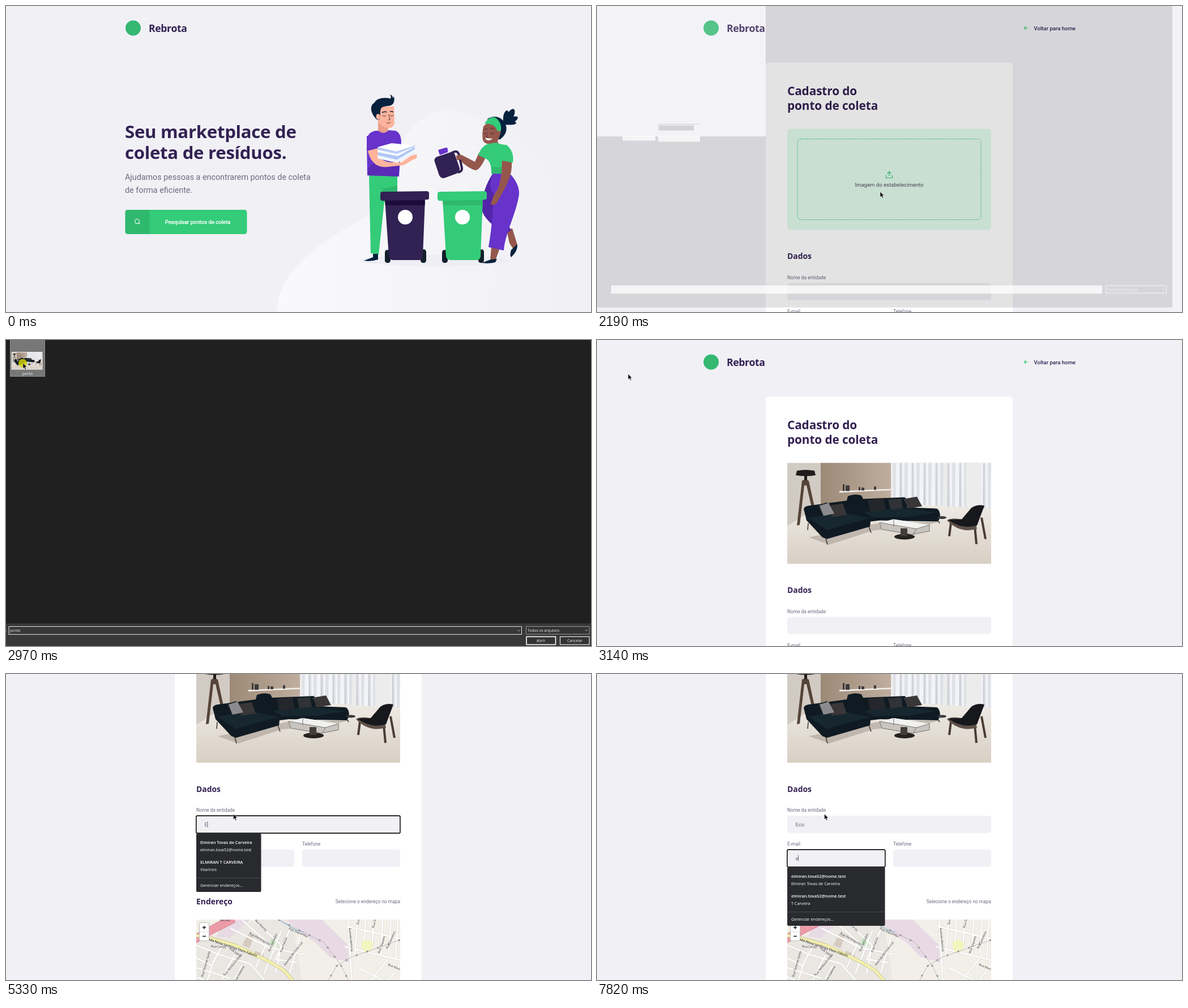
An HTML page that plays this animation: 1033x542 px, repeating every 8000 ms.

```html
<!DOCTYPE html>
<html lang="pt-BR">
<head>
<meta charset="utf-8">
<title>Cadastro de ponto de coleta</title>
<style>
  html, body { margin: 0; width: 100%; height: 100%; overflow: hidden; background: #f0f0f5; }
  svg { display: block; width: 100vw; height: 100vh; }
  text { font-family: Roboto, sans-serif; fill: #6c6c80; white-space: pre; }
  .title { font-family: "Noto Sans", "Open Sans", sans-serif; font-weight: 700; fill: #322153; }
  .h1 { font-size: 31.2px; letter-spacing: -.3px; }
  .h2 { font-size: 20.8px; letter-spacing: -.1px; }
  .h3 { font-size: 13.9px; }
  .brand { font-size: 17.6px; letter-spacing: -.35px; }
  .lead { font-size: 14.34px; }
  .label { font-size: 8.37px; }
  .body { font-size: 9.56px; }
  .field { fill: #f0f0f5; }
  .focus { fill: #f0f0f5; stroke: #101010; stroke-width: 1.6; }
  .skin { fill: #fdb39c; } .brown { fill: #95574c; }
  .navy { fill: #06213d; } .green { fill: #34cb79; } .deep { fill: #2fb86e; }
  .violet { fill: #6733cb; } .plum { fill: #322153; } .tyre { fill: #12202b; }
  .thin { fill: none; stroke: #3a2030; stroke-width: .9; stroke-linecap: round; }
  .ui text, .menu text { font-family: "Open Sans", "Noto Sans", sans-serif; font-size: 6.7px; fill: #f4f4f4; }
  .menu text { font-size: 7.2px; fill: #fff; }
  .menu .strong { font-weight: 600; font-size: 7.4px; }
  .menu path { stroke: #46484b; }
  .menu rect { fill: #292a2d; }
  .streets { fill: none; stroke-linejoin: round; }
  .map text { font-family: "Noto Sans", sans-serif; font-size: 5.4px; fill: #444; }
</style>
</head>
<body>
<svg viewBox="0 0 1033 542" preserveAspectRatio="none">
  <defs>
    <linearGradient id="blob" x1="0" x2="1"><stop stop-color="#f9f9fb"/><stop offset=".5" stop-color="#f5f5f8"/><stop offset="1" stop-color="#f0f0f5"/></linearGradient>
    <linearGradient id="wall"><stop stop-color="#9c8976"/><stop offset="1" stop-color="#bfae9f"/></linearGradient>
    <linearGradient id="floor" x2="0" y2="1"><stop stop-color="#eeeae4"/><stop offset="1" stop-color="#d8cfc4"/></linearGradient>
    <pattern id="curtain" width="21" height="90" patternUnits="userSpaceOnUse">
      <path fill="#dfe1e7" d="M0 0H21V90H0Z"/><path fill="#f3f4f8" d="M3 0H9V90H2ZM14 0H18V90H15Z"/><path fill="#c6c9d1" d="M11 0H12V90H10Z"/>
    </pattern>
    <clipPath id="photoBox"><path d="M0 0H360V179H0Z"/></clipPath>
    <clipPath id="mapBox"><rect width="360" height="209" rx="3"/></clipPath>
    <path id="roads" d="M0 45L40 62 95 78 120 107 135 209M12 130L30 75 45 48M35 130L58 80 70 60M55 130L80 82M80 0L125 40 105 85M100 0L150 45 140 95M60 15L130 50 190 62M150 20L120 95M168 12L140 70 178 76M0 85L60 104M0 68L28 82M0 102L90 135M183 30L165 95M285 0L280 60M299 0L295 55M314 0L310 50M329 0L326 62M344 0L340 58M356 0L352 70M265 12L360 34M262 48L360 72M290 130L345 62M322 130L360 80M268 0L276 130M285 85L360 122"/>

    <g id="photo" clip-path="url(#photoBox)">
      <path fill="#d2cbc4" d="M0 0H360V179H0Z"/>
      <path fill="url(#wall)" d="M59 0H183V75H59Z"/>
      <path fill="url(#curtain)" d="M187 0H360V90H187Z"/>
      <path fill="#edeced" d="M183 0H187V80H183ZM276 0H282V85H276ZM316 0H343V85H316Z"/>
      <path fill="url(#floor)" d="M0 112L60 74H232L360 82V179H0Z"/>
      <path fill="#f1eeea" d="M92 50L187 46V48.500L92 53Z"/>
      <path fill="#3e3b3b" d="M98 38h3v12h-3zM103 40h7v10h-7zM126 43h3v6h-3zM131 44h5v5h-5zM153 42h4v6h-4z"/>
      <path fill="#554438" d="M26 32Q32 27 38 32L48 78 43 79 34 40H30L22 110 17 111Z"/>
      <path fill="#201c1b" d="M17 14Q32 11 48 14L50 22Q33 25 15 22ZM30 22h5v9h-5z"/>
      <path fill="#a99f95" opacity=".6" d="M38 132L146 110 164 106 270 104 240 112 152 120 74 145Z"/>
      <path fill="#0f1a22" d="M29 82Q30 77 38 76L105 67 107 59Q120 54 131 58L134 64 207 61Q211 62 212 79L264 81Q270 84 270 97L266 104 164 102 147 104 146 113 70 135 62 132 34 102Z"/>
      <path fill="#17272f" d="M37 98L92 87 146 98 70 119ZM135 87L205 80 262 88 214 96 152 97Z"/>
      <path fill="#23272b" d="M54 75L70 70 82 90 63 94ZM142 66L170 63 174 84 146 86Z"/>
      <path fill="#393638" d="M77 75L98 72 105 92 79 96ZM205 64L229 60 238 77 214 81Z"/>
      <path fill="#8b8b8d" d="M57 76L73 71 83 90 64 94Z"/>
      <path fill="#303237" d="M178 65L201 63 204 80 182 83Z"/>
      <path fill="none" stroke="#403c3b" stroke-width="1.600" d="M37 107L36 119M68 134L71 145M144 113L148 124M266 102L269 107"/>
      <ellipse cx="273" cy="97" rx="8" ry="2.500" fill="#393a3d"/>
      <path fill="#c8c5c0" d="M163 106L187 100 251 109V121L220 127 167 118Z"/>
      <path fill="#f1f2f0" d="M164 106L188 100 251 110 228 117Z"/>
      <path fill="none" stroke="#777370" d="M163 106L167 118 220 127 251 121V110L228 117 163 106M228 117L222 127M188 100V113"/>
      <ellipse cx="207" cy="131" rx="18" ry="5" fill="#25211f"/>
      <path fill="#433d3a" d="M200 116h12v14h-12z"/>
      <path fill="none" stroke="#493c35" stroke-width="4" d="M289 106L286 130M331 112L334 144M343 97L350 135"/>
      <path fill="#5d5048" d="M282 102Q297 93 333 109L335 117Q305 126 282 102Z"/>
      <path fill="#17181c" d="M284 101L308 100 325 80Q335 73 348 76L335 111Q309 119 284 101Z"/>
    </g>

    <g id="brand"><circle cx="14.5" cy="39" r="13.5" fill="#34b872"/><text class="title brand" x="42" y="46">Rebrota</text></g>
  </defs>

  <g id="home">
    <path fill="url(#blob)" d="M478 542C477 475 548 424 607 390C674 351 677 335 689 280C700 219 736 185 784 185C824 185 848 212 886 231C954 265 999 323 1001 410V542Z"/>
    <use href="#brand" x="210"/>
    <text class="title h1" x="210" y="234">Seu marketplace de</text>
    <text class="title h1" x="210" y="271">coleta de resíduos.</text>
    <text class="lead" x="210" y="307.5">Ajudamos pessoas a encontrarem pontos de coleta</text>
    <text class="lead" x="210" y="330.5">de forma eficiente.</text>
    <rect id="button" x="210.5" y="361" width="215" height="43" rx="4.5"/>
    <path d="M215 361H253.500V404H215Q210.500 404 210.500 399.500V365.500Q210.500 361 215 361Z" fill="#000" opacity=".09"/>
    <path fill="none" stroke="#fff" stroke-width="1.1" stroke-linecap="round" d="M236 386L234 384M235.500 381.500a4 4 0 1 1-8 0a4 4 0 1 1 8 0"/>
    <text class="body" x="281" y="385.500" style="fill:#fff;stroke:#fff;stroke-width:.35px">Pesquisar pontos de coleta</text>

    <ellipse cx="758" cy="451" rx="133" ry="10" fill="#edecf2" opacity=".7"/>
    <g id="man">
      <path class="green" d="M641 299L691 300 691 347 668 347 658 440 644 438Z"/>
      <path class="deep" d="M664 324L691 318V330H664Z"/>
      <path class="navy" d="M648 439H657V449Q645 453 632 451L648 445Z"/>
      <path fill="#e99f8c" d="M657 202H675V224Q664 230 657 222Z"/>
      <path class="skin" d="M658 178H685L686 207Q684 217 674 216Q664 215 658 206Z"/>
      <path class="navy" d="M656 202C645 193 640 177 651 171C654 164 666 161 679 164Q681 161 678 157Q683 158 683 163L685 160Q688 175 676 177C666 178 662 178 661 186L660 200Z"/>
      <ellipse class="skin" cx="657" cy="196" rx="3.500" ry="5"/>
      <path class="thin" d="M665 194q3 3 6 0M679 194q3 2 5 0M672 207q3 2 7-1M676 192l2 9-3 1"/>
      <path d="M664 189q4-3 8-1M678 187q3-1 6 1" fill="none" stroke="#06213d" stroke-width="1.500"/>
      <path class="violet" d="M652 221H658Q666 229 676 220L688 221Q698 225 698 243L694 302 638 300 637 238Q638 224 652 221Z"/>
      <path fill="#5426ab" d="M656 270L694 278V302L638 300 639 288Z" opacity=".65"/>
      <path class="skin" d="M638 253L655 250 660 269Q668 276 681 277L699 277 714 266 724 263Q729 270 719 272L702 282 673 285Q645 288 638 253Z"/>
      <path class="violet" d="M637 230L658 235 656 252 637 257Z"/>
      <g id="papers">
        <path fill="#9eb7ec" d="M656 270L690 278 722 260V254L657 263Z"/>
        <path fill="#f0f5ff" d="M656 264L690 272 723 253V259L691 278 656 270Z"/>
        <path fill="#afc6f5" d="M657 258L690 266 722 248V253L691 272 657 264Z"/>
        <path fill="#f6f8ff" d="M656 254L690 261 723 246V249L692 266 656 259Z"/>
        <path fill="#b9cdf7" d="M656 250L689 258 722 246 722 249 690 262 656 254Z"/>
        <path fill="#fff" d="M656 250L681 243 722 247 689 258Z"/>
      </g>
      <path class="skin" d="M700 276l14-10 11-3q2 5-3 8l-19 7z"/>
    </g>

    <g id="woman">
      <g class="navy">
        <ellipse cx="890" cy="195" rx="6" ry="14" transform="rotate(28 890 195)"/>
        <ellipse cx="892" cy="203" rx="5" ry="13" transform="rotate(62 892 203)"/>
        <ellipse cx="883" cy="197" rx="5" ry="12" transform="rotate(8 883 197)"/>
        <ellipse cx="890" cy="207" rx="3.500" ry="11" transform="rotate(92 890 207)"/>
        <path d="M850 200Q867 190 880 205Q890 222 873 236L866 237Z"/>
      </g>
      <path class="brown" d="M843 213Q855 201 869 211L874 223 868 240 873 250 861 252 860 243Q851 247 844 241Q839 235 843 213Z"/>
      <path class="green" d="M845 209Q851 196 863 197Q876 205 874 221L868 222Q863 207 845 209Z"/>
      <path class="thin" d="M844 225q3 3 6 0M855 225q4 3 7 0M844 219q3-2 6-1M855 217q4-2 7 1M850 229l-2 4h3"/>
      <path fill="#fff" d="M847 233Q853 236 859 234Q854 241 847 236Z"/>
      <path class="brown" d="M835 260L846 270Q837 290 829 291Q817 288 802 274L796 272 795 265 805 264 828 276Z"/>
      <path class="brown" d="M884 397L894 394 903 423 896 431 889 420ZM857 426L872 429 864 451 855 451Z"/>
      <path class="navy" d="M903 422Q904 434 892 445Q889 443 892 432ZM840 455L856 449 867 448 864 454Q853 457 840 455Z"/>
      <path fill="#5325a9" d="M860 296L880 310 882 380 892 397 882 404Q845 381 840 361Q840 326 860 296Z"/>
      <path class="violet" d="M860 296H889Q907 315 906 334C900 371 882 400 879 433L852 427C857 399 858 381 860 354L861 332Q850 322 860 296Z"/>
      <path class="green" d="M866 242Q875 246 884 246Q898 258 895 277L891 279 889 297 857 296Q857 273 846 270L834 264Q839 248 852 244Z"/>
      <path class="deep" d="M858 284Q872 289 880 281L889 289V297H857Z"/>
      <path class="brown" d="M876 274L893 277C894 302 883 319 876 332L866 350Q859 355 856 350L861 336 868 325Q876 306 876 274Z"/>
    </g>
    <g id="jug">
      <path d="M786 261Q797 253 800 264L805 287Q806 293 798 295" fill="none" stroke="#322153" stroke-width="4"/>
      <path class="plum" d="M761 267L785 259Q791 257 793 264L801 287Q802 294 795 297L776 304Q769 307 765 300L757 276Q755 270 761 267Z"/>
      <path class="violet" d="M763 255L776 251Q780 250 780 255V259L766 264Z"/>
      <path class="brown" d="M795 265l8-2 4 4-2 5-8 1z"/>
    </g>
    <g class="tyre">
      <rect x="669" y="432" width="10" height="23" rx="4.500"/><rect x="732" y="431" width="10" height="24" rx="4.500"/>
      <rect x="770" y="432" width="10" height="23" rx="4.500"/><rect x="834" y="431" width="10" height="24" rx="4.500"/>
    </g>
    <path class="plum" d="M669 342H740L736 443Q736 450 730 450H683Q677 450 676 443Z"/>
    <path fill="#1c0c3c" d="M669 344H740L739.500 353H670Z"/>
    <path class="plum" d="M664 329L743 328Q747 328 747 332V340Q747 343 743 343L665 345Q661 345 661 341V333Q661 329 664 329Z"/>
    <path class="green" d="M771 342H842L838 443Q837 450 831 450H785Q778 450 777 443Z"/>
    <path class="deep" d="M771 344H842L841.500 353H772Z"/>
    <path class="green" d="M766 329L845 328Q849 328 849 332V340Q849 343 845 343L766 345Q762 345 762 341V333Q762 329 766 329Z"/>
    <g fill="#fff"><circle cx="705" cy="374" r="13"/><circle cx="806" cy="374" r="13"/></g>
  </g>

  <g id="form">
    <use href="#brand" x="187"/>
    <path d="M761 39H754.500M757.500 36L754.500 39 757.500 42" fill="none" stroke="#34cb79" stroke-width="1.100"/>
    <text class="body" x="771.500" y="42.500" style="fill:#322153;font-weight:500">Voltar para home</text>
    <rect x="298" y="100" width="436" height="900" rx="5" fill="#fff"/>
    <text class="title h2" x="336" y="158">Cadastro do</text>
    <text class="title h2" x="336" y="183.500">ponto de coleta</text>
    <g id="dropzone">
      <rect x="336" y="217.500" width="360" height="179" rx="6" fill="#e1faec"/>
      <rect x="354" y="235.500" width="324" height="143" rx="6" fill="none" stroke="#4ecb79" stroke-dasharray="2 1.300"/>
      <path d="M516 301V293.500M512.500 297L516 293.500 519.500 297M510.500 299.500V304.500H521.500V299.500" fill="none" stroke="#34cb79" stroke-width="1.200"/>
      <text class="body" x="516" y="320" text-anchor="middle" style="fill:#4e4958">Imagem do estabelecimento</text>
    </g>
    <use id="upload" href="#photo" x="336" y="217.500"/>
    <text class="title h3" x="336" y="448">Dados</text>
    <text class="label" x="336" y="483.500">Nome da entidade</text>
    <rect class="field" x="336" y="490.500" width="360" height="30.500" rx="4.500"/>
    <text class="label" x="336" y="543.500">E-mail</text>
    <rect class="field" x="336" y="550.500" width="173" height="30.500" rx="4.500"/>
    <text class="label" x="523" y="543.500">Telefone</text>
    <rect class="field" x="523" y="550.500" width="173" height="30.500" rx="4.500"/>
    <rect id="nameFocus" class="focus" x="335.800" y="490.600" width="360.200" height="30.800" rx="2"/>
    <rect id="mailFocus" class="focus" x="335.800" y="550.600" width="173" height="30.800" rx="2"/>
    <text id="nameText" class="body" x="350.500" y="509.500"></text>
    <text id="mailText" class="body" x="350.500" y="569.500"></text>
    <path id="caret" d="M0 0V11" stroke="#555566" stroke-width=".8"/>
    <text class="title h3" x="336" y="647">Endereço</text>
    <text class="label" x="696" y="645.500" text-anchor="end">Selecione o endereço no mapa</text>

    <g class="map" transform="translate(336 674.500)" clip-path="url(#mapBox)">
      <path fill="#f2efe9" d="M0 0H360V209H0Z"/>
      <path fill="#eae7e3" d="M0 40L105 0H170L185 100 170 209H0Z"/>
      <path fill="#e8dae4" d="M160 0H222L267 44 270 76 235 66 212 42 183 22ZM50 0H95L60 32 36 30Z"/>
      <path fill="#c8e3c3" d="M133 31l14 5-5 12-13-4z"/>
      <path fill="#d6cabf" d="M92 25l10 4-8 22-13-6zM104 55l16 7-3 6-15-5z"/>
      <use class="streets" href="#roads" stroke="#d0ccc6" stroke-width="3.600"/>
      <use class="streets" href="#roads" stroke="#fff" stroke-width="2.700"/>
      <path fill="#f2f5bd" d="M292 40q9-8 20 1 0 14-10 17-11 0-10-18"/>
      <path class="streets" stroke="#d97f91" stroke-width="15" d="M-5 36L35 14 66-2"/>
      <path class="streets" stroke="#eb9ba8" stroke-width="13" d="M-5 36L35 14 66-2"/>
      <path class="streets" stroke="#bbb58a" stroke-width="6" d="M0 28L28 34 70 46 98 60 130 75 155 90 185 125"/>
      <path class="streets" stroke="#f5f0ad" stroke-width="4.800" d="M0 28L28 34 70 46 98 60 130 75 155 90 185 125"/>
      <path class="streets" stroke="#8dbad7" stroke-width="1.300" d="M145 0L177 19 190 22"/>
      <path class="streets" stroke="#b3aeae" stroke-width=".8" d="M145 0L180 18 225 40 255 80 280 130M360 36L275 66 248 82 220 130"/>
      <path class="streets" stroke="#99979a" stroke-width="3" stroke-dasharray="3 17" d="M145 0L180 18 225 40 255 80 280 130M360 36L275 66 248 82 220 130"/>
      <text x="42" y="3">BR-900</text>
      <text x="22" y="37" transform="rotate(19 22 37)" style="font-size:6.300px;fill:#222">ida Nova Jaritinga Dom Fabelo</text>
      <text x="26" y="49" transform="rotate(4 26 49)">Rua Corva</text>
      <text x="12" y="102" transform="rotate(-74 12 102)">Rua Tenente Vardo</text>
      <text x="50" y="100" transform="rotate(-50 50 100)">Rua Tamboril Velho</text>
      <text x="70" y="110" transform="rotate(-60 70 110)">Rua Itabena</text>
      <text x="58" y="52" transform="rotate(35 58 52)">Rua Igaro</text>
      <text x="93" y="25" transform="rotate(30 93 25)">Rua Merinópolis</text>
      <text x="103" y="2" transform="rotate(45 103 2)">Rua Mardo</text>
      <text x="130" y="57" transform="rotate(-67 130 57)">Rua Serradim</text>
      <text x="151" y="58" transform="rotate(-70 151 58)">Rua Palista</text>
      <text x="163" y="17" transform="rotate(24 163 17)">Rua Itapemba</text>
      <text x="157" y="82" transform="rotate(-53 157 82)">Avenida Moreda Lua</text>
      <text x="269" y="15" transform="rotate(84 269 15)">Avenida Bertuna</text>
      <text x="287" y="9" transform="rotate(-84 287 9)">Rua Ode</text>
      <text x="314" y="15" transform="rotate(-78 314 15)">Rua Ilma</text>
      <text x="324" y="60" transform="rotate(-72 324 60)">Rua Taquera</text>
      <text x="338" y="52" transform="rotate(-65 338 52)">Rua Sandeiro</text>
      <text x="338" y="81" transform="rotate(22 338 81)">Rua Marune</text>
      <rect x="5.500" y="5.500" width="17" height="32" rx="2.500" fill="#fff" stroke="#bbb"/>
      <path d="M6 22H22" stroke="#ccc" stroke-width=".6"/>
      <path d="M11 14H17M14 11V17M11 29.500H17" stroke="#111" stroke-width="1.300"/>
    </g>

    <g id="nameMenu" class="menu" transform="translate(336 522)">
      <rect width="114.500" height="103.500" rx="2"/><path d="M0 79H114.500"/>
      <text class="strong" x="7" y="18.500">Elmiran Tovas de Carveira</text>
      <text x="7" y="31">elmiran.tova52@nome.test</text>
      <text class="strong" x="7" y="53">ELMIRAN T CARVEIRA</text>
      <text x="7" y="66">Vilarinos</text>
      <text x="7" y="94.500">Gerenciar endereços...</text>
    </g>
    <g id="mailMenu" class="menu" transform="translate(336 582)">
      <rect width="172.500" height="103.500" rx="2"/><path d="M0 79H172.500"/>
      <text class="strong" x="7" y="18.500">elmiran.tova52@nome.test</text>
      <text x="7" y="31">Elmiran Tovas de Carveira</text>
      <text class="strong" x="7" y="53">elmiran.tova52@nome.test</text>
      <text x="7" y="66">T Carveira</text>
      <text x="7" y="94.500">Gerenciar endereços...</text>
    </g>
  </g>
  <rect id="status" y="538.800" width="345.500" height="4" fill="#222126"/>

  <g id="veil" class="ui">
    <path d="M298 0H1016V534H0V231H298Z" opacity=".108"/>
    <g fill="#fff">
      <path opacity=".16" d="M0 0H298V231H0ZM1016 0H1033V542H1016Z"/>
      <path opacity=".75" d="M45 230H103V238.500H45ZM108 230H182V240.500H108ZM25 495H892V509.500H25Z"/>
    </g>
    <path d="M182 209.500H108.500V222H182M898.500 495.500H1005.500V508.500H898.500ZM998 501l2 2 2-2" fill="none" stroke="#f5f5f7"/>
    <path d="M108.500 222V209.500H182" fill="none" stroke="#c9c9cf" stroke-width=".8"/>
    <path d="M110 211.500H171V220.500H110Z" fill="#d2d2d7"/>
    <text x="901" y="504.500" style="font-size:6.400px">Todos os arquivos</text>
  </g>

  <g id="dialog" class="ui">
    <path fill="#202020" d="M0 0H1042V548H0Z"/>
    <path fill="#383838" d="M0 502H1042V548H0Z"/>
    <g id="selection"><rect x="7.500" y="-5" width="61" height="69.500" fill="#777" stroke="#8c8c8c"/></g>
    <path fill="#eee" d="M9.500 21H64.500V52.500H9.500Z"/>
    <use href="#photo" transform="translate(10 22) scale(.15 .165)"/>
    <text x="38" y="61.500" text-anchor="middle">ponto</text>
    <text x="-.5" y="517">:</text>
    <rect x="5" y="507.500" width="905.500" height="14" fill="#383838" stroke="#e5e5e5"/>
    <text id="fileName" x="7" y="517">ponto</text>
    <rect x="918.500" y="507.500" width="111.500" height="13.500" fill="#333" stroke="#999"/>
    <path d="M903.500 513.500l2.300 2.300 2.300-2.300M1022.500 513l2.300 2.300 2.300-2.300" fill="none" stroke="#ccc" stroke-width=".8"/>
    <text x="921" y="516.800">Todos os arquivos</text>
    <rect x="919" y="525.500" width="51.500" height="14" fill="#333" stroke="#fff" stroke-width="1.600"/>
    <rect x="978.500" y="525.500" width="51.500" height="14" fill="#333" stroke="#ddd" stroke-width="1.300"/>
    <text x="944.500" y="535" text-anchor="middle">Abrir</text>
    <text x="1004.500" y="535" text-anchor="middle">Cancelar</text>
  </g>

  <g id="cursor">
    <circle id="click" cx="-.5" cy="0" r="7.500" fill="#cdd000" opacity=".85"/>
    <path id="arrow" d="M0 0V9.500L2.200 7.600 3.900 11.200 5.500 10.500 3.900 7H6.800Z" stroke="#fff" stroke-width=".5"/>
    <path id="hand" d="M-1.200 8V1a1.200 1.200 0 0 1 2.400 0V5L5 5.800Q6.500 6.200 6.300 8L5.300 13H-.3L-3.800 8.500Q-3.500 6.500-1.200 8Z" fill="#fff" stroke="#222" stroke-width=".9"/>
  </g>
</svg>
<script>
const LOOP = 8000;
const $ = id => document.getElementById(id);
const show = (id, on) => { $(id).style.display = on ? '' : 'none'; };
const within = (t, from, to) => t >= from && t < to;
const ramp = (t, from, to) => Math.min(1, Math.max(0, (t - from) / (to - from)));

// Keys are [time, ...values]; each span is eased in and out.
function track(keys, t) {
  const next = keys.findIndex(key => key[0] > t);
  if (next === 0) return keys[0].slice(1);
  if (next < 0) return keys.at(-1).slice(1);
  const a = keys[next - 1], b = keys[next];
  const k = ramp(t, a[0], b[0]), eased = k * k * (3 - 2 * k);
  return a.slice(1).map((v, i) => v + (b[i + 1] - v) * eased);
}

const pointer = [
  [140, 716, 532], [480, 560, 455], [790, 364, 378], [860, 361, 376], [1240, 361, 376],
  [1700, 506, 316], [2030, 500, 329], [2400, 500, 329], [2800, 30, 41], [3060, 30, 41],
  [3480, 287, 238], [3770, 287, 238], [3850, 332, 298], [4080, 365, 283],
  [4320, 400, 247], [4700, 400, 247], [4710, 401.5, 248]
];
const scroll = [[3480, 0], [3640, 70], [3770, 167.5], [3850, 239.5]];

function drawForm(t) {
  const [top] = track(scroll, t);
  $('form').setAttribute('transform', `translate(0 ${-top})`);
  const uploaded = t >= 3060;
  show('upload', uploaded);
  show('dropzone', !uploaded);

  const onName = within(t, 4480, 5950), onMail = t >= 5950;
  show('nameFocus', onName);
  show('mailFocus', onMail);
  const name = 'Eco'.slice(0, (t >= 5330) + (t >= 5490) + (t >= 5570));
  const mail = t >= 7820 ? 'e' : '';
  $('nameText').textContent = name;
  $('mailText').textContent = mail;
  show('nameMenu', within(t, 5330, 5490));
  show('mailMenu', t >= 7820);

  const caretOff = within(t, 5020, 5330) || within(t, 6500, 6960) || within(t, 7510, 7820);
  show('caret', t >= 4480 && !caretOff);
  const typed = onMail ? $('mailText') : $('nameText');
  const x = 350.5 + (typed.textContent ? typed.getComputedTextLength() : 0);
  $('caret').setAttribute('transform', `translate(${x} ${onMail ? 560 : 500.5})`);
}

function drawDialog(t) {
  show('veil', within(t, 2190, 2270));
  show('dialog', within(t, 2270, 3140));
  const opened = ramp(t, 2190, 2400), closing = ramp(t, 3060, 3140);
  const scale = 0.957 + 0.043 * opened - 0.043 * closing;
  $('dialog').setAttribute('transform', `translate(470 228) scale(${scale}) translate(-470 -228)`);
  $('dialog').style.opacity = opened * (1 - closing);
  show('selection', t >= 2760);
  show('fileName', t >= 2880);
}

function draw(t) {
  const atHome = t < 1020;
  show('home', atHome);
  show('form', !atHome);
  const hover = ramp(t, 690, 860);
  const mix = (a, b) => Math.round(a + (b - a) * hover);
  $('button').setAttribute('fill', `rgb(${mix(52, 47)},${mix(203, 184)},${mix(121, 110)})`);
  show('status', within(t, 780, 1240));
  if (!atHome) drawForm(t);
  drawDialog(t);

  const [x, y] = track(pointer, t);
  show('cursor', t >= 140);
  $('cursor').setAttribute('transform', `translate(${x} ${y})`);
  const pointing = within(t, 690, 1090);
  show('hand', pointing);
  show('arrow', !pointing);
  show('click', within(t, 2880, 3060));
}

const start = performance.now();
function tick() {
  draw((performance.now() - start) % LOOP);
  requestAnimationFrame(tick);
}
tick();
</script>
</body>
</html>
```
